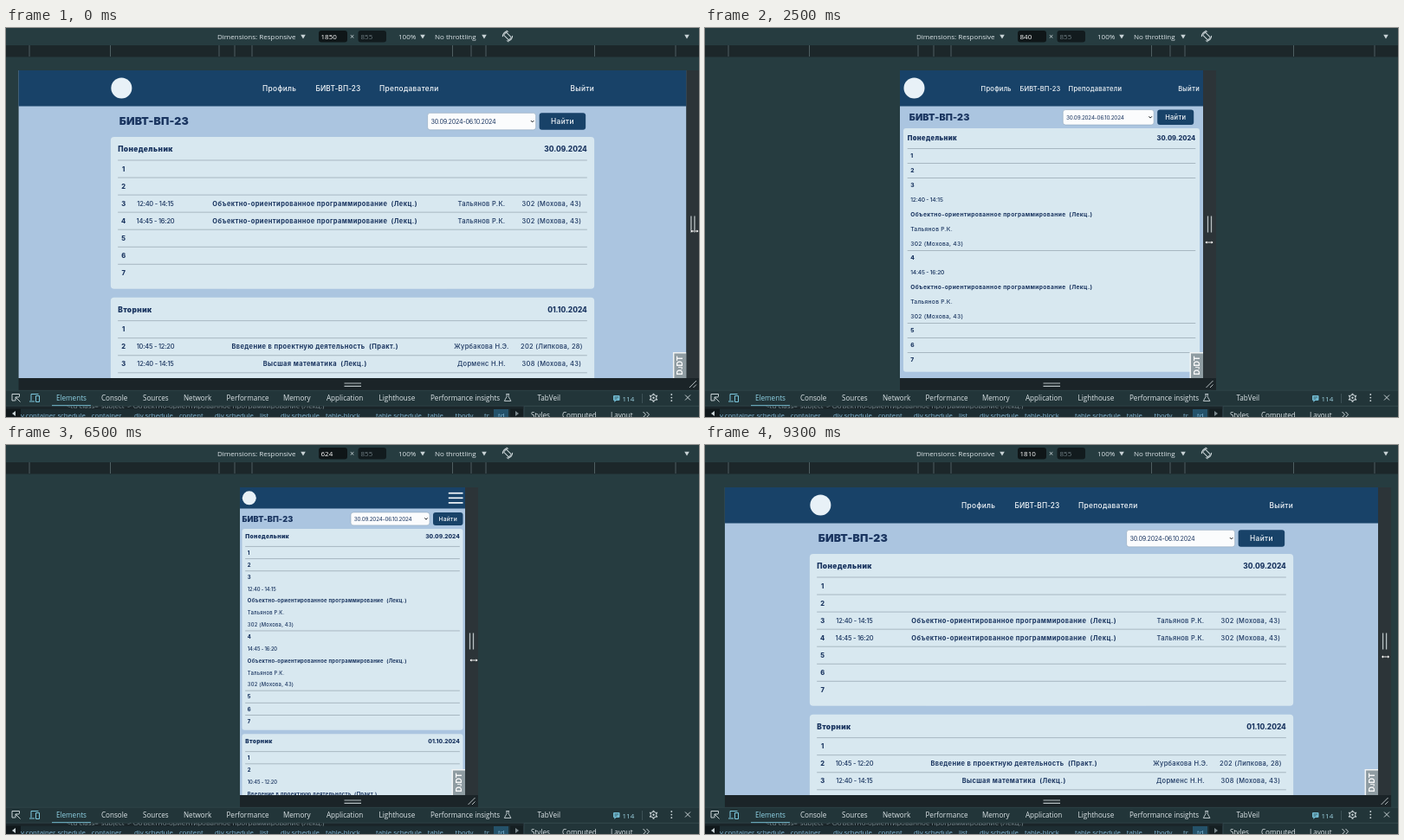
Animation, 800 px wide and 450 px high, one loop 9400 ms. Source, as an HTML page:

```html
<!DOCTYPE html>
<html lang="ru">
<head>
<meta charset="utf-8">
<title>Responsive schedule</title>
<style>
html, body { margin: 0; width: 100%; height: 100%; overflow: hidden; background: #263c40; }
svg { display: block; width: 100vw; height: 100vh; }
text { font-family: Inter, sans-serif; fill: #1a3560; white-space: pre; }
.ui text { font-family: "Open Sans", sans-serif; fill: #dde5e8; }
</style>
</head>
<body>
<svg viewBox="0 0 800 450" xmlns="http://www.w3.org/2000/svg">
  <defs>
    <clipPath id="view"><rect x="0" y="49" width="800" height="356"/></clipPath>
    <clipPath id="code"><rect x="0" y="437.6" width="598" height="3.2"/></clipPath>
  </defs>
  <rect width="800" height="450" fill="#263c40"/>
  <g id="page" clip-path="url(#view)"></g>
  <g id="frame"></g>
  <g id="tools" class="ui"></g>
  <g id="size" class="ui"></g>
  <g id="pointer"></g>
</svg>
<script>
const LOOP = 9400, STEP = 100, SCALE = 1 / 2.4, NB = '\u00a0\u00a0';
const NAVY = '#184268', WHITE = '#f4f8fb';
const $ = id => document.getElementById(id);

// viewport width in CSS pixels over time
const WIDTH = [[0, 1850], [1000, 1637], [1500, 1242], [2000, 994], [2500, 840], [3000, 634], [4000, 375],
  [4800, 326], [6000, 413], [6500, 624], [7700, 1450], [8000, 1656], [9000, 1810], [9400, 1810]];
// pointer: distance from the page edge, height
const SHIFT = [[0, 9.5], [1500, 7.3], [2500, 7], [4800, 8], [6500, 10], [7700, 10], [9300, 8.5], [9400, 8.5]];
const HEIGHT = [[0, 235], [1500, 236], [2500, 248], [4800, 254], [6500, 249], [7700, 245], [9400, 245]];

const teacherA = 'Тальянов Р.К.', roomA = '302 (Мохова, 43)';
const oop = `Объектно-ориентированное программирование${NB}(Лекц.)`;
const DAYS = [
  { name: 'Понедельник', date: '30.09.2024', rows: {
    3: ['12:40 - 14:15', oop, teacherA, roomA],
    4: ['14:45 - 16:20', oop, teacherA, roomA] } },
  { name: 'Вторник', date: '01.10.2024', rows: {
    2: ['10:45 - 12:20', `Введение в проектную деятельность${NB}(Практ.)`, 'Журбакова Н.Э.', '202 (Липкова, 28)'],
    3: ['12:40 - 14:15', `Высшая математика${NB}(Лекц.)`, 'Дорменс Н.Н.', '308 (Мохова, 43)'] } }
];

// table columns: centre, share of the width, padding, mean glyph width
const COLS = [[.08, .11, 1, .446], [.42, .5675, 4, .629], [.775, .145, 4, .595], [.9245, .1525, 10, .54]];

const LARGE = { edge: 12.2, head: 41.5, top: 126, title: 12.4, day: 8.33, cell: 7.5, nav: 8.33, pick: 7.15,
  titleY: 108, titleX: 10, dayY: 14.5, first: 27, row: 20.05, lh: 11.2, pad: 8.3, gap: 10,
  selW: 125, btnW: 53.5, boxH: 19.5, links: [-104, -42.5, 31], table: true };
const MEDIUM = { edge: 4, head: 41.5, top: 116, title: 10.8, day: 7.5, cell: 6.67, nav: 7.5, pick: 6.35,
  titleY: 103.2, titleX: 6.8, dayY: 11.3, first: 23.5, row: 17, sub: 16.8, lh: 10, pad: 5.2, gap: 8,
  selW: 105, btnW: 42, boxH: 17.5, links: [-81.5, -36.5, 19.5], inset: 3.5 };
const SMALL = { edge: 2.5, head: 24.5, top: 97, title: 9.15, day: 6.67, cell: 5.83, nav: 6.67, pick: 6.35,
  titleY: 85.3, titleX: 0, dayY: 8.6, first: 20.4, row: 14.15, sub: 13.85, lh: 8.75, pad: 3.2, gap: 4.4,
  selW: 91, btnW: 34.5, boxH: 15, inset: 2.7 };

// monotone cubic through the points
function curve(pts, t) {
  const slope = i => (pts[i + 1][1] - pts[i][1]) / (pts[i + 1][0] - pts[i][0]);
  const tangent = i => {
    if (i === 0 || i === pts.length - 1) return 0;
    const a = slope(i - 1), b = slope(i);
    return a * b <= 0 ? 0 : 2 * a * b / (a + b);
  };
  let i = 0;
  while (i < pts.length - 2 && t >= pts[i + 1][0]) i++;
  const [x0, y0] = pts[i], [x1, y1] = pts[i + 1], h = x1 - x0, u = (t - x0) / h, v = 1 - u;
  return y0 * (1 + 2 * u) * v * v + y1 * u * u * (3 - 2 * u) + h * u * v * (tangent(i) * v - tangent(i + 1) * u);
}

const rect = (x, y, w, h, fill, r = 0, extra = '') =>
  `<rect x="${x}" y="${y}" width="${w}" height="${h}" rx="${r}" fill="${fill}" ${extra}/>`;
const path = (d, stroke, w = 1, fill = 'none', extra = '') =>
  `<path d="${d}" stroke="${stroke}" stroke-width="${w}" fill="${fill}" ${extra}/>`;

// digits set tighter than words, bold words a little wider
const spacing = (str, w) => /^[\d.:\s-]+$/.test(str) ? (w < 700 ? -.03 : 0) : w < 700 ? .04 : .052;

// text centred vertically on y
function label(str, x, y, size, { w = 500, a = 'start', c = '', sp = spacing(str, w) } = {}) {
  const fill = c ? ` style="fill:${c}"` : '';
  return `<text x="${x}" y="${y + size * .36}" font-size="${size}" font-weight="${w}" text-anchor="${a}"` +
    ` letter-spacing="${sp * size}"${fill}>${str}</text>`;
}

function wrap(str, room, glyph) {
  const lines = [];
  for (const word of str.split(' ')) {
    const last = lines.length - 1, joined = lines[last] + ' ' + word;
    if (last >= 0 && joined.length * glyph <= room) lines[last] = joined;
    else lines.push(word);
  }
  return lines;
}

const block = (lines, x, y, m, opt) =>
  lines.map((s, i) => label(s, x, y + (i - (lines.length - 1) / 2) * m.lh, m.cell, opt)).join('');

function tableRow(n, cells, x, y, w, m) {
  const parts = cells.map((s, i) => wrap(s, w * COLS[i][1] - COLS[i][2], COLS[i][3] * m.cell));
  const h = m.row + (Math.max(1, ...parts.map(p => p.length)) - 1) * m.lh, mid = y + h / 2;
  let out = label(n, x + 6.5, mid, m.cell, { w: 800, a: 'middle' });
  parts.forEach((p, i) => out += block(p, x + w * COLS[i][0], mid, m, { w: i === 1 ? 700 : 500, a: 'middle' }));
  return [out, h];
}

function stackRow(n, cells, x, y, w, m) {
  const left = x + m.inset;
  if (!cells.length) return [label(n, left, y + m.row / 2, m.cell, { w: 800 }), m.row];
  let out = label(n, left, y + m.sub / 2, m.cell, { w: 800 }), h = m.sub;
  cells.forEach((s, i) => {
    const p = wrap(s, w - m.inset * 2, COLS[i][3] * m.cell), ch = m.sub + (p.length - 1) * m.lh;
    out += block(p, left, y + h + ch / 2, m, { w: i === 1 ? 700 : 500 });
    h += ch;
  });
  return [out, h];
}

function dayCard(day, x, y, w, m) {
  const inset = m.table ? 8.3 : m.inset * 1.35, tx = x + inset, tw = w - inset * 2;
  let out = label(day.name, tx, y + m.dayY, m.day, { w: 900 }) +
    label(day.date, tx + tw, y + m.dayY, m.day, { w: 800, a: 'end' });
  let yy = y + m.first;
  for (let n = 1; n <= 7; n++) {
    const [row, h] = (m.table ? tableRow : stackRow)(n, day.rows[n] || [], tx, yy, tw, m);
    out += path(`M${tx} ${yy}h${tw}`, '#93a3ae', .7) + row;
    yy += h;
  }
  const h = yy + m.pad - y;
  return [rect(x, y, w, h, '#d8e8f0', m.table ? 4 : 3) + out, h];
}

function drawPage(w) {
  const m = w >= 992 ? LARGE : w >= 768 ? MEDIUM : SMALL;
  const pw = w * SCALE, left = 400 - pw / 2, right = 400 + pw / 2;
  const cw = Math.min(558.3, pw - m.edge * 2), x = 400 - cw / 2, xr = x + cw;
  let out = rect(left, 49, pw, 356, '#abc5e0') + rect(left, 49, pw, m.head, NAVY);

  if (m === SMALL) {
    out += `<circle cx="${x + 8.3}" cy="61.3" r="8" fill="#e8f1f7"/>`;
    for (const y of [55.7, 61.3, 66.9]) out += path(`M${xr - 16.7} ${y}h16.7`, WHITE, 1.7);
  } else {
    out += `<circle cx="${x + 12.5}" cy="69.6" r="12" fill="#e8f1f7"/>`;
    ['Профиль', 'БИВТ-ВП-23', 'Преподаватели'].forEach((s, i) =>
      out += label(s, 400 + m.links[i], 70, m.nav, { c: WHITE, sp: i === 1 ? .01 : .04 }));
    out += label('Выйти', xr, 70, m.nav, { c: WHITE, a: 'end' });
  }

  const split = m === SMALL && cw < 195;
  const bx = split ? x + m.selW + 4 : xr - m.titleX - m.btnW, sx = bx - 4 - m.selW;
  const by = split ? 103.3 : m.titleY + .1, y0 = by - m.boxH / 2, cx = sx + m.selW - 4;
  out += label('БИВТ-ВП-23', x + m.titleX, split ? 84.8 : m.titleY, m.title, { w: 900, sp: .01 }) +
    rect(sx, y0, m.selW, m.boxH, '#fbfcfd', 3, 'stroke="#8fa6bd" stroke-width=".6"') +
    label('30.09.2024-06.10.2024', sx + 3.8, by + .3, m.pick, { w: 400 }) +
    path(`M${cx - 1.7} ${by - 1}l1.7 1.8 1.7-1.8`, '#10151a', 1) +
    rect(bx, y0, m.btnW, m.boxH, NAVY, 3) +
    label('Найти', bx + m.btnW / 2, by, m.nav, { a: 'middle', c: WHITE });

  let y = split ? 114.5 : m.top;
  for (const day of DAYS) {
    const [card, h] = dayCard(day, x, y, cw, m);
    out += card;
    y += h + m.gap;
  }

  // debug toolbar tab
  out += rect(right - 15.5, 375, 15.5, 30, '#f0f3f4') + rect(right - 14, 376.5, 14, 28.5, '#8f9ca2') +
    `<text transform="translate(${right - 4} 401.5) rotate(-90)" font-size="9" font-weight="700"` +
    ` style="fill:#fff">D<tspan font-size="6">J</tspan>DT</text>`;
  $('page').innerHTML = out;

  $('frame').innerHTML = rect(right, 49, 15, 356, '#2c3438') + rect(left, 405, pw + 15, 14, '#1b2428') +
    path(`M${right + 5.5} 217.5v19M${right + 9.5} 217.5v19`, '#b9c1c4', 1.3) +
    path('M390.5 411h19.5M390.5 414.3h19.5', '#b9c1c4', 1.2) +
    path(`M${right + 3.5} 416l8-8M${right + 8} 416l3.5-3.5`, '#b9c1c4', 1);
}

function drawTools() {
  const soft = '#c9d3d6';
  const say = (s, x, y, size = 8.1, c = '') => label(s, x, y, size, { w: 400, c, sp: 0 });
  const caret = (x, y) => path(`M${x - 2.8} ${y - 2.2}h5.6l-2.8 4.6z`, 'none', 0, soft);
  let out = rect(0, 20, 800, 13.5, '#1c272a');
  for (const x of [27, 120.5, 246, 264, 284, 515.5, 537, 554, 679.5, 773]) out += path(`M${x} 20v13`, '#5d6e72', .8);

  out += say('Dimensions: Responsive', 244, 10, 8) + caret(343, 10) +
    rect(361, 3, 33, 13.5, '#0f1618', 3) + say('×', 397, 10, 9, soft) +
    rect(406.5, 3, 32.5, 13.5, '#121b1e', 3) + say('855', 409.5, 10, 8, '#6d7b80') +
    say('100%', 453, 10, 8) + caret(481, 10) + say('No throttling', 495, 10, 8) + caret(552, 10) + caret(786, 10);
  out += '<g transform="translate(579 9.5)">' +
    rect(-2.2, -4.2, 4.4, 8.4, 'none', .8, `stroke="${soft}" transform="rotate(-45)"`) +
    path('M-5.6 .6a5.7 5.7 0 0 1 5.6-6.2l-1.4-1M5.6-.6a5.7 5.7 0 0 1-5.6 6.2l1.4 1', soft, 1.1) + '</g>';

  out += rect(0, 419, 800, 31, '#223539') + path('M0 419.3h800', '#344a4f', .6);
  const tabs = [['Elements', 58], ['Console', 110], ['Sources', 158], ['Network', 205], ['Performance', 254.5], ['Memory', 320],
    ['Application', 370], ['Lighthouse', 430.5], ['Performance insights', 490], ['TabVeil', 613.5]];
  tabs.forEach(([s, x], i) => out += say(s, x, 428, 8.1, i ? '' : '#8fd3e6'));
  out += path('M7 431v-7.5h8.5v3M7 431h3.5M11 427l5.5 5.5M11 431.2v-4.2h4.2', soft, 1) +
    path('M29 431v-7.5h8.5M27 432h6M34.5 425.5h4v7h-4z', '#7cc8de', 1) +
    path('M577.3 423.5h3.8M578 423.5v3l-2.7 5h7.6l-2.7-5v-3', soft, .9) +
    rect(701, 425, 7.5, 6, '#72bcd3', 1) + path('M702.3 431v2l2-2z', 'none', 0, '#72bcd3') +
    path('M702.5 427h4.5M702.5 429h3', '#223539', .7) + say('114', 711.5, 429, 8, '#9fd5e4') +
    path('M734.5 423v11', '#4a5e63', .7) +
    '<g transform="translate(747.5 427.7)">' + path('M0-5v10M-4.4-2.5l8.8 5M-4.4 2.5l8.8-5', soft, 1.8) +
    `<circle r="3.4" fill="#223539" stroke="${soft}"/><circle r="1.2" fill="${soft}"/></g>` +
    path('M784 424.5l6 6M790 424.5l-6 6', soft, 1);
  for (const y of [424, 427.6, 431.2]) out += `<circle cx="768.3" cy="${y}" r=".9" fill="${soft}"/>`;

  out += path('M0 437.3h800', '#41575c', .6) + path('M53 436.7h45', '#7cc8de', 1.1) +
    rect(0, 437.6, 598, 13, '#1a2529') +
    `<g clip-path="url(#code)">${say(`&lt;td class="subject"&gt; Объектно-ориентированное программирование (Лекц.)`, 70, 437.5, 8, '#7f9298')}</g>` +
    rect(0, 441, 598, 9, '#1d2d32') + rect(563, 441, 17, 9, '#24526a');
  const crumbs = [['y.container.schedule__container', 17], ['div.schedule__content', 148], ['div.schedule__list', 241],
    ['div.schedule__table-block', 317], ['table.schedule__table', 427], ['tbody', 518.5], ['tr', 552], ['td', 568]];
  for (const [s, x] of crumbs) out += say(s, x, 448, 7.8, '#83b9d8');
  out += rect(0, 440.5, 17, 10, '#10181b') + path('M11 443l-4 3 4 3z', 'none', 0, soft) +
    rect(582, 440.5, 15, 10, '#151f22') + path('M588 443l4 3-4 3z', 'none', 0, '#7c898d') +
    path('M598 437.5v13', '#41575c', .6) +
    say('Styles', 606, 448) + say('Computed', 642, 448) + say('Layout', 698, 448) +
    path('M735.5 444l3 3.2-3 3.2M739.5 444l3 3.2-3 3.2', soft, 1);
  $('tools').innerHTML = out;
}

let shown = -1;
function draw(t) {
  const step = Math.floor(t / STEP) * STEP;
  if (step === shown) return;
  shown = step;
  const w = 2 * Math.round(curve(WIDTH, step) / 2);
  drawPage(w);
  $('size').innerHTML = label(w, 363.5, 10, 8, { w: 400, c: '#fff', sp: 0 });
  const px = 400 + w * SCALE / 2 + curve(SHIFT, step);
  $('pointer').innerHTML = path('M-4.6 0l2-1.7v1.2h5.2v-1.2l2 1.7-2 1.7v-1.2h-5.2v1.2z', '#14191b', .7, '#fff',
    `paint-order="stroke" transform="translate(${px} ${curve(HEIGHT, step)})"`);
}

const start = performance.now();
function tick() {
  draw((performance.now() - start) % LOOP);
  requestAnimationFrame(tick);
}
drawTools();
tick();
</script>
</body>
</html>
```
